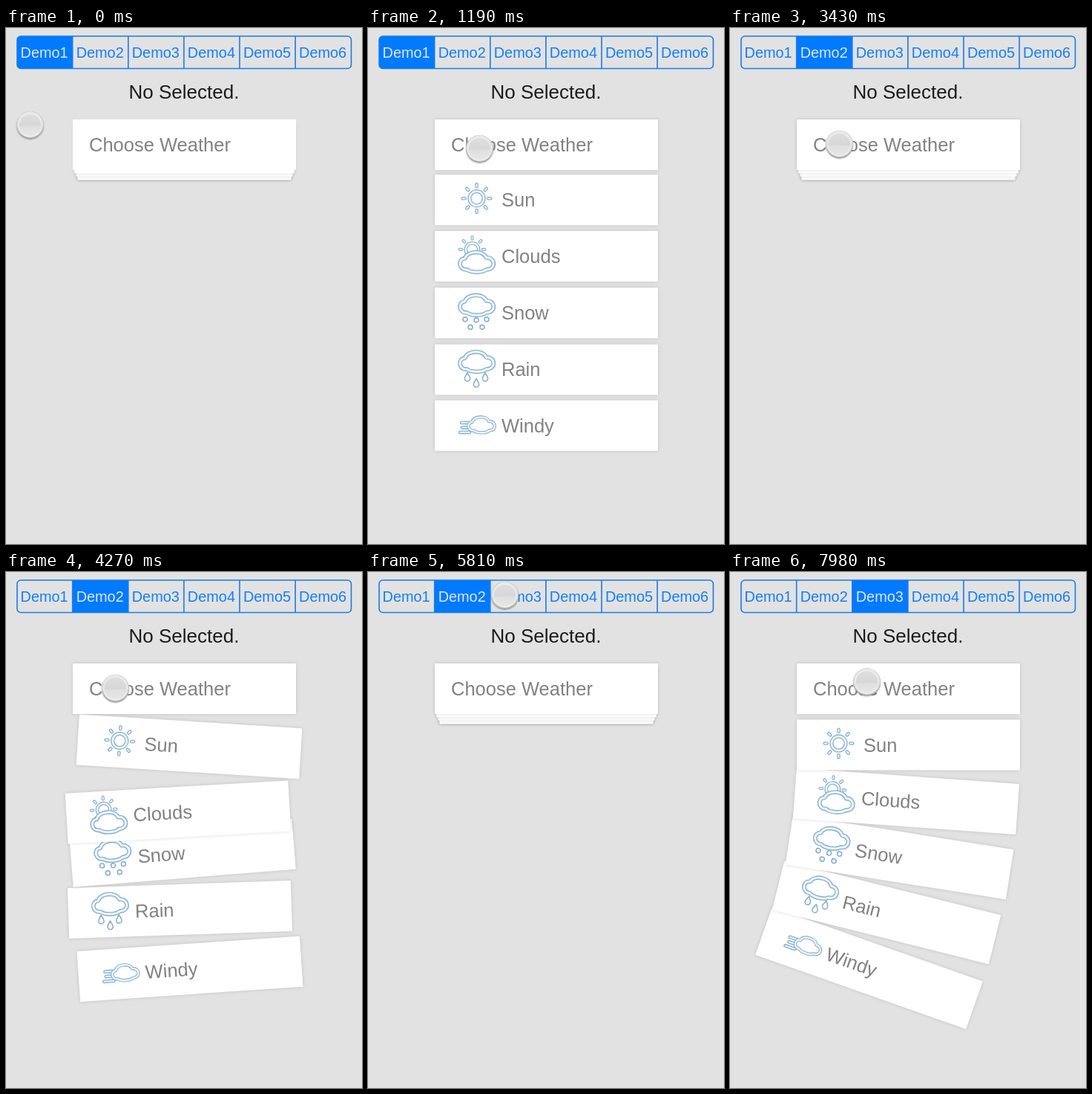
Animation, 480 px wide and 694 px high, one loop 8000 ms. Source, as an HTML page:

```html
<!DOCTYPE html>
<html lang="en">
<head>
<meta charset="utf-8">
<title>Drop-down menu demo</title>
<style>
html, body { margin: 0; width: 100%; height: 100%; overflow: hidden; background: #e2e2e2; }
body { position: relative; font-family: "Liberation Sans", Arial, sans-serif; }
.tabs { position: absolute; left: 0; top: 0; }
.tabs .frame { fill: none; stroke: #1a7bea; stroke-width: 1.6; }
.tab rect { fill: transparent; }
.tab text { fill: #1480f5; font-size: 19.9px; text-anchor: middle; }
.tab.on rect { fill: #007aff; }
.tab.on text { fill: #dfe7f2; }
.label {
  position: absolute; left: 0; top: 70px; width: 480px;
  text-align: center; font-size: 26px; line-height: 32px; color: #1b1b1d;
}
.card {
  position: absolute; left: 90px; top: 123px; width: 301px; height: 68px;
  background: #fff; border-radius: 1px; color: #828282;
  box-shadow: 0 0 5px rgba(0, 0, 0, .14);
  font-size: 25.5px; line-height: 68px; white-space: nowrap;
}
.card span { position: absolute; left: 90px; top: 0; }
.card.head span { left: 22px; }
.card svg { position: absolute; left: 0; top: 0; overflow: visible; }
.pointer {
  position: absolute; left: -18.5px; top: -18.5px; width: 37px; height: 37px; border-radius: 50%;
  background: linear-gradient(#ececec, #e6e6e7 60%, #f4f4f4);
  box-shadow: inset 0 0 1.5px #a8a8aa, inset 0 -1.5px 1.5px #949496, 0 1px 1.5px rgba(0, 0, 0, .35);
}
.pointer::after {
  content: ""; position: absolute; left: 4px; top: 4px; width: 29px; height: 29px; border-radius: 50%;
  background: linear-gradient(#dededf, #d7d7d9 50%, #e0e0e1 60%, #e6e6e6);
}
.edge { fill: #fff; stroke: #88b0cc; stroke-linecap: round; stroke-linejoin: round; }
.core { fill: none; stroke: #edf6fc; stroke-linecap: round; stroke-linejoin: round; }
</style>
</head>
<body>
<svg class="tabs" width="480" height="64">
  <clipPath id="round"><rect x="15" y="11" width="450.5" height="43.5" rx="5"/></clipPath>
  <g id="tabs" clip-path="url(#round)"></g>
  <rect class="frame" x="15" y="11" width="450.5" height="43.5" rx="5"/>
</svg>
<div class="label">No Selected.</div>
<div id="menu"></div>
<div class="pointer"></div>
<script>
const LOOP = 8000;
const PITCH = 75.3;
const TAB = 75.1;
const OMEGA = 0.021;   // spring frequency, rad per ms
const ZETA = 0.5;
const STAGGER = 38;
const FOLD_TIME = 230;

// Per demo: when it is selected, opens and folds, plus [dx, dy, degrees] of each open card
const demos = [
  { from: 0, open: 640, close: 1500, poses: [] },
  { from: 2660, open: 3510, close: 5150,
    poses: [[6.5, 2.5, 3.6], [-8.5, 15.5, -3.3], [-2.5, -5, -4.6], [-6, -4, -1.9], [7.5, 0.5, -3.9]] },
  { from: 6160, open: 7272, close: Infinity,
    poses: [[0, 0, 0], [-3, 0.5, 4.1], [-12, 0.5, 9], [-29.5, 0, 14], [-53, -0.5, 19.4]] }
];

// Pointer stops: [arrive, leave, x, y]
const stops = [
  [0, 20, 32, 130],
  [280, 1900, 150, 162],
  [2590, 2740, 126, 36],
  [3400, 5420, 147, 156],
  [5800, 6440, 184, 31],
  [7130, LOOP, 184, 147.5]
];

// ---- icons: a wide edge stroke with a pale core reads as a double outline ----
const tube = (d, w, core) =>
  `<path class="edge" d="${d}" stroke-width="${w}"/><path class="core" d="${d}" stroke-width="${core}"/>`;
const ring = (x, y, r) => `M${x - r} ${y}a${r} ${r} 0 1 1 ${2 * r} 0a${r} ${r} 0 1 1 ${-2 * r} 0z`;
const at = (x, y, s, body) => `<g transform="translate(${x} ${y}) scale(${s})">${body}</g>`;

function sun() {
  let rays = "";
  for (let i = 0; i < 8; i++) {
    const a = i * Math.PI / 4, c = Math.cos(a), s = Math.sin(a);
    rays += `M${15.8 * c} ${15.8 * s}L${18.8 * c} ${18.8 * s}`;
  }
  return tube(rays, 4.6, 2) + tube(ring(0, 0, 9.6), 5.2, 2.6);
}
const cloud = tube("M-13 10C-24 11-26-4-16-5C-12-16 9-16 13-6" +
  "C25-7 27 10 13 10C8 14.5-8 14.5-13 10Z", 5.8, 3);
const flake = (x, y) =>
  `<path class="edge" stroke-width="1.6" d="${ring(x, y, 3)}"/>`;
const drop = (x, y) =>
  `<path class="edge" stroke-width="1.6" d="M${x} ${y - 6}c1 3 3.6 5 3.6 8a3.6 3.6 0 0 1-7.2 0c0-3 2.6-5 3.6-8z"/>`;

// Icon coordinates are within the 301 x 68 card
const items = [
  ["Sun", at(56.5, 32, 1, sun())],
  ["Clouds", at(50.5, 25, 0.9, sun()) + at(56.5, 42, 1, cloud)],
  ["Snow", at(56.5, 23.5, 1, cloud) +
    [[41, 42.5], [56, 43.5], [70, 42.5], [48, 53], [64, 53]].map(p => flake(...p)).join("")],
  ["Rain", at(56.5, 23.5, 1, cloud) + drop(44, 44) + drop(68, 44) + drop(56, 52)],
  ["Windy", tube("M36 30H46M37 36.5H47M34 43H47", 4.8, 2) + at(63, 33, 0.78, cloud)]
];

// ---- build ----
const menu = document.getElementById("menu");
const pointer = document.querySelector(".pointer");
const tabBar = document.getElementById("tabs");

for (let i = 0; i < 6; i++) {
  const x = 14.6 + i * TAB;
  tabBar.innerHTML += `<g class="tab"><rect x="${x}" y="11" width="${TAB}" height="44"/>` +
    `<text x="${x + 37}" y="40.3">Demo${i + 1}</text></g>` +
    (i ? `<path class="frame" d="M${x} 11V55"/>` : "");
}
const tabs = [...tabBar.querySelectorAll(".tab")];

function addCard(text, icon, z) {
  const el = document.createElement("div");
  el.className = icon ? "card" : "card head";
  el.style.zIndex = z;
  el.innerHTML = (icon ? `<svg width="301" height="68">${icon}</svg>` : "") + `<span>${text}</span>`;
  menu.append(el);
  return el;
}
const cards = items.map(([text, icon], i) => addCard(text, icon, 5 - i));
const head = addCard("Choose Weather", "", 6);
pointer.style.zIndex = 9;

// ---- motion ----
const clamp = v => Math.min(1, Math.max(0, v));
const smooth = v => v * v * (3 - 2 * v);
const mix = (a, b, p) => a + (b - a) * p;

function spring(ms) {
  if (ms <= 0) return 0;
  const x = ms * OMEGA, q = Math.sqrt(1 - ZETA * ZETA);
  return 1 - Math.exp(-ZETA * x) * (Math.cos(q * x) + ZETA / q * Math.sin(q * x));
}

// 0 = folded, 1 = open; the lowest card leads
function openness(demo, i, t) {
  const lag = 4 - i;
  if (t < demo.close) return spring(t - demo.open - lag * STAGGER);
  return 1 - smooth(clamp((t - demo.close - lag * 18) / FOLD_TIME));
}

function placeCard(el, i, demo, p) {
  const depth = Math.min(i + 1, 3);
  const foldScale = 1 - 0.0145 * depth;
  const foldY = 34 + 4.4 * depth - 34 * foldScale;
  const [dx, dy, turn] = demo.poses[i] || [0, 0, 0];
  const y = mix(foldY, PITCH * (i + 1) + dy, p);
  const scale = mix(foldScale, 1, clamp(p));
  el.style.transform = `translate(${dx * p}px, ${y}px) rotate(${turn * p}deg) scale(${scale})`;
}

function placePointer(t) {
  let n = stops.length - 1;
  while (t < stops[n][0]) n--;
  const [, leave, x, y] = stops[n];
  const next = stops[n + 1] || stops[n];
  const p = t > leave ? smooth(clamp((t - leave) / (next[0] - leave))) : 0;
  pointer.style.transform = `translate(${mix(x, next[2], p)}px, ${mix(y, next[3], p)}px)`;
}

function draw(now) {
  const t = now % LOOP;
  let n = demos.length - 1;
  while (t < demos[n].from) n--;
  const demo = demos[n];
  tabs.forEach((el, i) => el.classList.toggle("on", i === n));
  cards.forEach((el, i) => placeCard(el, i, demo, openness(demo, i, t)));
  const shade = n ? 1 : clamp(openness(demo, 0, t));
  head.style.boxShadow = `0 0 5px rgba(0, 0, 0, ${0.14 * shade})`;
  placePointer(t);
  requestAnimationFrame(draw);
}
requestAnimationFrame(draw);
</script>
</body>
</html>
```
